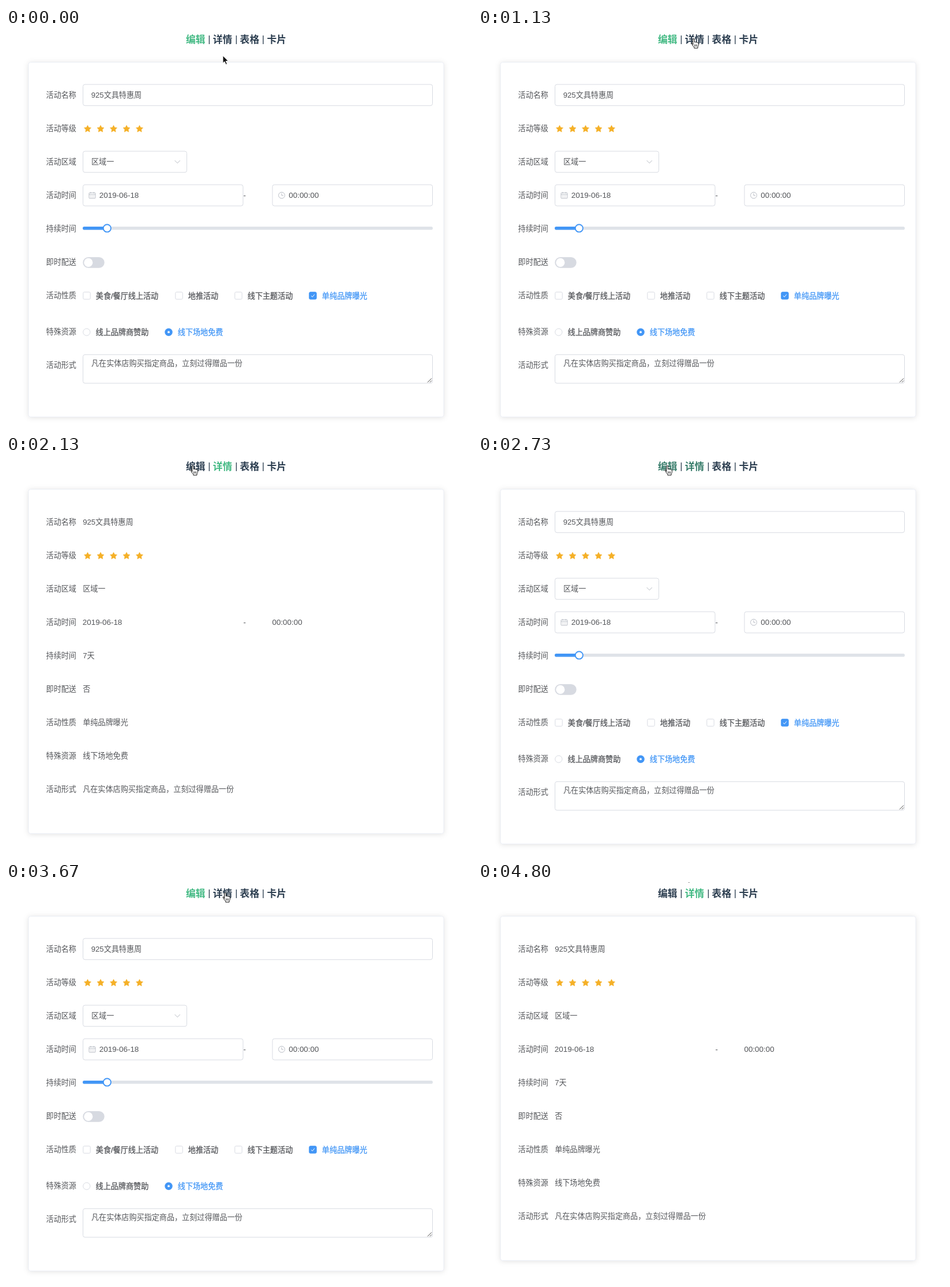
Write an HTML page that moves like this. It is 808 px wide and 693 px high and loops after 4.87 s.

```html
<!DOCTYPE html>
<html lang="zh-CN">
<head>
<meta charset="utf-8">
<title>活动表单</title>
<style>
html, body { margin: 0; width: 100%; height: 100%; overflow: hidden; background: #fff; }
svg { display: block; width: 100%; height: 100%; }
text { font: 13.1px "Liberation Sans", "Noto Sans CJK SC", "Noto Sans CJK", sans-serif; fill: #54565a; white-space: pre; }
.num { font-size: 13.4px; }
.opt { stroke: #54565a; stroke-width: .3; }
.on { fill: #4296f6; stroke: #4296f6; stroke-width: .3; }
.nav { font-size: 16.8px; font-weight: 700; fill: #2c3e50; }
.bar { font-size: 16.8px; fill: #2c3e50; text-anchor: middle; }
.box { fill: #fff; stroke: #d8dbe2; }
.icon { fill: none; stroke: #b9bdc5; }
.card { fill: #fff; stroke: #ebeef5; filter: drop-shadow(0 1.5px 5px rgba(0, 0, 0, .11)); }
</style>
</head>
<body>
<svg id="stage" viewBox="0 0 808 693">
  <rect id="card" class="card" x="39" y="59.5" width="720" rx="3.7"/>
  <g id="nav"></g>
  <g id="labels"></g>
  <g id="edit"></g>
  <g id="detail"></g>
  <g id="cursor">
    <path id="arrow" fill="#111" stroke="#fff" stroke-width="1" stroke-linejoin="round"
      d="M0 0V13.2L3 10.4L5.2 15.4L7.5 14.4L5.3 9.6H9.6Z"/>
    <g id="hand" stroke="#111" stroke-linejoin="round" stroke-linecap="round">
      <path fill="#fff" d="M-1.3 10V1.5a1.3 1.3 0 0 1 2.6 0V6.3q1.3-1.2 2.5.2q1.5-.9 2.4.5q2-.4 2.2 1.4V11q-.2 2-1.4 3.4V16.6H.8V15q-2-2-3.4-4.6Q-4.6 8-3.6 7.4Q-2.5 7-1.3 9Z"/>
      <path fill="none" stroke-width=".8" d="M1.5 10.5v3M3.5 10.5v3M5.5 10.5v3"/>
    </g>
  </g>
</svg>
<script>
const LOOP = 4870, BLEND = 68;
const NS = "http://www.w3.org/2000/svg";
const $ = id => document.getElementById(id);

function add(parent, tag, attrs, content) {
  const el = document.createElementNS(NS, tag);
  for (const k in attrs) el.setAttribute(k, attrs[k]);
  if (content) el.textContent = content;
  return parent.appendChild(el);
}
// y is the vertical middle of the line
const text = (g, x, y, str, cls = "") => add(g, "text", { x, y: y + 4.9, class: cls }, str);
const rect = (g, x, y, width, height, rx, attrs) => add(g, "rect", { x, y, width, height, rx, ...attrs });
const circle = (g, cx, cy, r, attrs) => add(g, "circle", { cx, cy, r, ...attrs });
const path = (g, d, attrs) => add(g, "path", { d, ...attrs });
const box = (g, x, y, w, h) => rect(g, x, y, w, h, 3.5, { class: "box" });

const BLUE = "#4296f6";
const NAME = "925文具特惠周", AREA = "区域一", DATE = "2019-06-18", TIME = "00:00:00";
const NOTE = "凡在实体店购买指定商品，立刻过得赠品一份";
const KIND = "单纯品牌曝光", PLACE = "线下场地免费";
const rowY = i => 116.5 + 58 * i;

// Navigation
const nav = $("nav");
const links = ["编辑", "详情", "表格", "卡片"].map((s, i) =>
  add(nav, "text", { x: 312 + 46.8 * i, y: 25.9, class: "nav" }, s));
[352.5, 399.5, 446].forEach(x => add(nav, "text", { x, y: 24.6, class: "bar" }, "|"));

// Labels and stars
const labels = ["活动名称", "活动等级", "活动区域", "活动时间", "持续时间", "即时配送", "活动性质", "特殊资源", "活动形式"]
  .map((s, i) => text($("labels"), 69.6, rowY(i), s));
function star(cx, cy, r) {
  const pts = [];
  for (let i = 0; i < 10; i++) {
    const a = Math.PI * (i / 5 - .5), q = i % 2 ? r * .5 : r;
    pts.push((cx + q * Math.cos(a)).toFixed(2) + "," + (cy + q * Math.sin(a)).toFixed(2));
  }
  add($("labels"), "polygon", { points: pts.join(" "), fill: "#f5b027", stroke: "#f5b027", "stroke-width": .7, "stroke-linejoin": "round" });
}
for (let i = 0; i < 5; i++) star(141.5 + 22.5 * i, 175.3, 6.3);

// Form view
function buildEdit(g) {
  box(g, 133.5, 98, 606, 36.8);
  text(g, 147.8, 116.5, NAME);

  box(g, 133.5, 214, 180, 36.8);
  text(g, 148, 232.5, AREA);
  path(g, "M292.6 230L297.2 234.8L301.8 230", { class: "icon" });

  box(g, 133.5, 272.2, 277.5, 36.8);
  rect(g, 144, 286.2, 11, 9.6, 1, { class: "icon" });
  path(g, "M144 289.2h11M146.8 284.8v2.6M152.2 284.8v2.6", { class: "icon" });
  path(g, "M146 291.5h7M146 293.8h7", { class: "icon", "stroke-dasharray": "1.4 1.4", "stroke-width": .8 });
  text(g, 161.8, 290.5, DATE, "num");
  text(g, 411.5, 290.5, "-", "num");
  box(g, 462, 272.2, 277.5, 36.8);
  circle(g, 478, 290.6, 5.4, { class: "icon" });
  path(g, "M478 287.2v3.8h3", { class: "icon" });
  text(g, 490.3, 290.5, TIME, "num");

  rect(g, 133, 345, 607, 5.6, 2.8, { fill: "#dfe3e9" });
  rect(g, 133, 345, 43, 5.6, 2.8, { fill: BLUE });
  circle(g, 175.3, 347.8, 6.6, { fill: "#fff", stroke: BLUE, "stroke-width": 1.9 });

  rect(g, 133.3, 398, 37.4, 18.8, 9.4, { fill: "#d7dae1" });
  circle(g, 142.8, 407.4, 7.6, { fill: "#fff" });

  [[140, "美食/餐厅线上活动"], [300, "地推活动"], [403, "线下主题活动"], [532, KIND]].forEach(([x, s], i) => {
    const on = i === 3;
    rect(g, x - 6.2, 458.7, 12.4, 12.4, 1.9, on ? { fill: BLUE, stroke: BLUE } : { class: "box" });
    if (on) path(g, "M529.2 465L531.3 467.2L535 462.6", { fill: "none", stroke: "#fff" });
    text(g, x + 15.8, 464.8, s, on ? "on" : "opt");
  });

  circle(g, 139.8, 528.2, 6.1, { class: "box" });
  text(g, 155.6, 527.6, "线上品牌商赞助", "opt");
  circle(g, 282, 528.2, 6.7, { fill: BLUE });
  circle(g, 282, 528.2, 1.9, { fill: "#fff" });
  text(g, 297.8, 527.6, PLACE, "on");

  box(g, 133.5, 567.3, 606, 49.7);
  text(g, 148, 582, NOTE);
  path(g, "M731 615.5L738 608.5M735 615.5L738 612.5", { fill: "none", stroke: "#444" });
}

// Read-only view
function buildDetail(g) {
  const x = 133.2;
  text(g, x, 116.5, NAME);
  text(g, x, 232.5, AREA);
  text(g, x - .4, 290.5, DATE, "num");
  text(g, 411.5, 290.5, "-", "num");
  text(g, 461.5, 290.5, TIME, "num");
  text(g, x, 348, "7天");
  text(g, x, 406.5, "否");
  text(g, x, 464.5, KIND);
  text(g, x, 522.5, PLACE);
  text(g, x, 580.5, NOTE);
}
buildEdit($("edit"));
buildDetail($("detail"));

// Clicks: [time, link index]; pointer stops: [time, x, y]
const clicks = [[1330, 1], [2725, 0], [4465, 1]];
const stops = [
  [0, 376, 48], [600, 376, 48], [1000, 374, 18.4], [1640, 374, 18.4], [2060, 324, 18.4],
  [2400, 324, 18.4], [2680, 328, 18.4], [2950, 328, 18.4], [3500, 380, 18.4],
  [4560, 380, 18.4], [4800, 360, -14], [LOOP, 360, -20]
];

function pointer(t) {
  let i = 0;
  while (i < stops.length - 2 && t >= stops[i + 1][0]) i++;
  const [t0, x0, y0] = stops[i], [t1, x1, y1] = stops[i + 1];
  const p = (t - t0) / (t1 - t0), e = p * p * (3 - 2 * p);
  return [x0 + (x1 - x0) * e, y0 + (y1 - y0) * e];
}

const DARK = [44, 62, 80], GREEN = [66, 185, 131];
const tint = k => "rgb(" + DARK.map((d, i) => Math.round(d + (GREEN[i] - d) * k)) + ")";
const show = (id, on) => $(id).setAttribute("display", on ? "inline" : "none");

function draw(t) {
  let view = 0, since = Infinity;
  for (const [at, v] of clicks) if (t >= at) { view = v; since = t - at; }
  const k = since < BLEND ? .5 : 1;

  show("edit", view === 0);
  show("detail", view === 1);
  $("card").setAttribute("height", view ? 598 : 616);
  labels[7].setAttribute("y", rowY(7) + (view ? 4.9 : 9.9));
  labels[8].setAttribute("y", rowY(8) + (view ? 4.9 : 9.9));
  links[view].style.fill = tint(k);
  links[1 - view].style.fill = tint(1 - k);

  const [x, y] = pointer(t);
  const over = y > 9 && y < 30 && (x > 312 && x < 346 || x > 359 && x < 393);
  $("cursor").setAttribute("transform", `translate(${x.toFixed(2)} ${y.toFixed(2)})`);
  show("hand", over);
  show("arrow", !over);
}

const start = performance.now();
function tick() {
  draw((performance.now() - start) % LOOP);
  requestAnimationFrame(tick);
}
tick();
</script>
</body>
</html>
```
